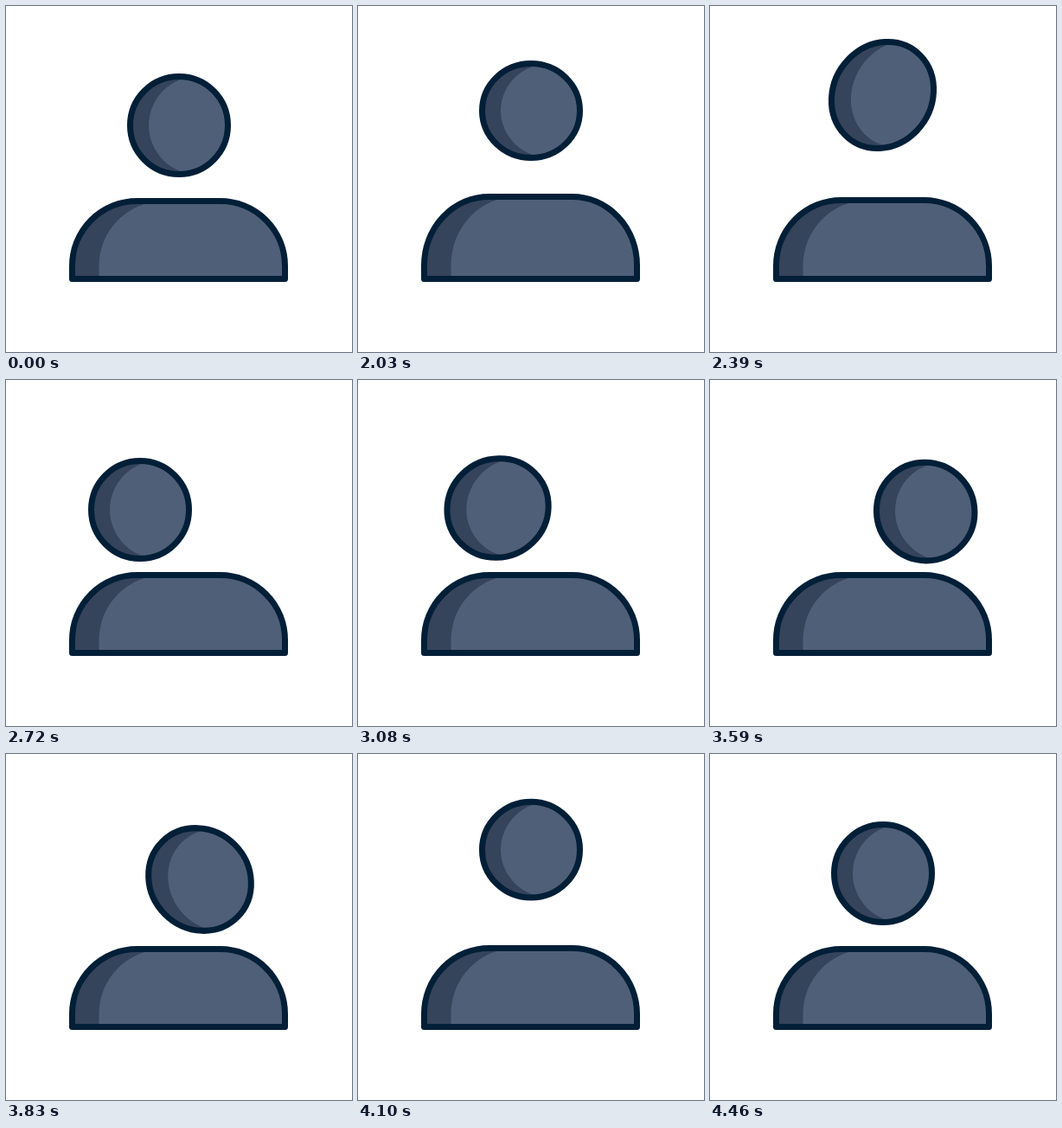
Write an HTML page that moves like this. It is 400 px wide and 400 px high and loops after 4.55 s.

```html
<!DOCTYPE html>
<html>
<head>
<meta charset="utf-8">
<style>
  html, body { margin: 0; height: 100%; overflow: hidden; background: #fff; }
  svg { display: block; width: 100%; height: 100%; }
  .shade { fill: #35435b; }
  .light { fill: #505f78; }
  .line { fill: none; stroke: #021f38; stroke-width: 7; stroke-linejoin: round; vector-effect: non-scaling-stroke; }
</style>
</head>
<body>
<svg viewBox="0 0 400 400">
  <defs>
    <circle id="disc" r="56.5"/>
    <path id="bust" d="M-123 0v-15a75 75 0 0 1 75-75h96a75 75 0 0 1 75 75v15z"/>
    <clipPath id="inDisc"><use href="#disc"/></clipPath>
    <clipPath id="inBust"><use href="#bust"/></clipPath>
  </defs>
  <g id="body">
    <use href="#bust" class="shade"/>
    <g clip-path="url(#inBust)"><use href="#bust" x="31" class="light"/></g>
    <path class="line" d="M-123 0v-15a75 75 0 0 1 75-75h96a75 75 0 0 1 75 75v15z"/>
  </g>
  <g id="head">
    <use href="#disc" class="shade"/>
    <g clip-path="url(#inDisc)"><use href="#disc" x="21.5" class="light"/></g>
    <circle class="line" r="56.5"/>
  </g>
</svg>
<script>
const LOOP = 4550, START = 2030, STEP = 30;

// time, x, y, horizontal scale, vertical scale, diagonal stretch
const headKeys = [
  [1970, 200, 138, 1, 1, 0],
  [2030, 200, 121, 1, .965, 0],
  [2270, 200, 98, 1, 1.03, 0],
  [2390, 199.5, 103, 1.044, 1.087, -.054],
  [2540, 141, 150, 1.035, 1, 0],
  [2720, 155, 150, 1, 1, 0],
  [2900, 155, 150, 1, 1, 0],
  [3020, 139, 158, 1.04, 1.04, -.03],
  [3140, 200, 138, 1.03, .99, 0],
  [3230, 249.5, 150.5, .937, .99, .036],
  [3350, 245, 150, 1, 1, 0],
  [3530, 245, 150, 1, 1, 0],
  [3680, 257, 156, 1.02, 1.02, .03],
  [3830, 224, 145, 1.05, 1.05, .04],
  [4040, 200, 99, 1, 1, 0],
  [4220, 200, 144, 1, .95, 0],
  [4340, 200, 136, 1, 1.02, 0],
  [4460, 200, 138, 1, 1, 0]
];

// time, rise of the shoulders
const bodyKeys = [
  [1970, 0], [2030, 5], [2100, 6], [2390, 1], [2480, 0], [3860, 0],
  [3980, 4], [4130, 0], [4240, -4], [4350, 1], [4460, 0]
];

const slope = (keys, i, c) => (keys[i + 1][c] - keys[i][c]) / (keys[i + 1][0] - keys[i][0]);

// Monotone tangent: flat at extremes and holds
function tangent(keys, i, c) {
  if (i === 0 || i === keys.length - 1) return 0;
  const a = slope(keys, i - 1, c), b = slope(keys, i, c);
  return a * b > 0 ? 2 * a * b / (a + b) : 0;
}

function sample(keys, t) {
  const last = keys.length - 1;
  if (t < START || t >= keys[last][0]) return keys[last].slice(1);
  const i = keys.findIndex(k => k[0] > t) - 1;
  const span = keys[i + 1][0] - keys[i][0], u = (t - keys[i][0]) / span, v = 1 - u;
  return keys[i].slice(1).map((from, n) => {
    const c = n + 1;
    return from * v * v * (1 + 2 * u) + keys[i + 1][c] * u * u * (3 - 2 * u)
      + span * u * v * (v * tangent(keys, i, c) - u * tangent(keys, i + 1, c));
  });
}

const head = document.getElementById('head');
const body = document.getElementById('body');

function draw(now) {
  const time = now % LOOP;
  const t = START + Math.floor((time - START) / STEP) * STEP;
  const [x, y, sx, sy, k] = sample(headKeys, t);
  const [rise] = sample(bodyKeys, t);
  head.setAttribute('transform', `matrix(${sx} ${k} ${k} ${sy} ${x} ${y})`);
  body.setAttribute('transform', `translate(199.5 315.5) scale(1 ${1 + rise / 90})`);
}

const begin = performance.now();
function tick() {
  draw(performance.now() - begin);
  requestAnimationFrame(tick);
}
tick();
</script>
</body>
</html>
```
